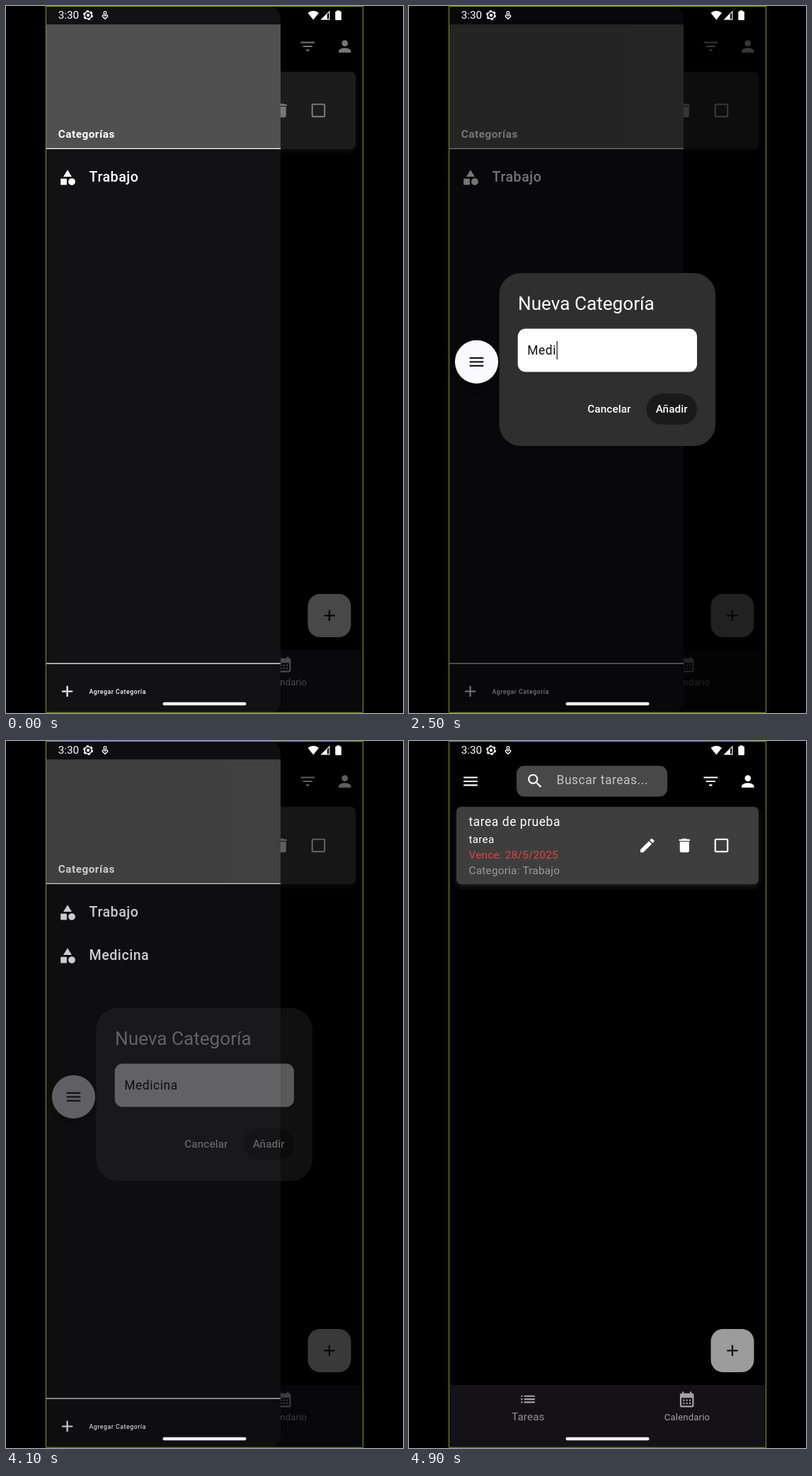
Write an HTML page that moves like this. It is 561 px wide and 998 px high and loops after 5000 ms.

```html
<!DOCTYPE html>
<html lang="es">
<head>
<meta charset="utf-8">
<title>Nueva categoría</title>
<style>
html, body { margin: 0; width: 100%; height: 100%; overflow: hidden; background: #000; }
#stage { display: block; width: 561px; height: 998px; font-family: Roboto, sans-serif; fill: #fff; }

/* type scale */
.body { font-size: 17.44px; letter-spacing: .545px; }
.small { font-size: 15.26px; letter-spacing: .27px; }
.item { font-size: 19.62px; letter-spacing: .5px; font-weight: 500; }
.label { font-size: 15.26px; letter-spacing: .11px; font-weight: 500; }
.head { font-size: 15.26px; letter-spacing: .545px; font-weight: 700; }
.tiny { font-size: 8.72px; letter-spacing: .545px; font-weight: 500; }
.title { font-size: 26.15px; }

/* one shared clock, held in 100 ms steps (2 %) */
.anim { animation: 5s step-end infinite; }
.drawer { animation-name: drawer; }
.scrim { animation-name: scrim; }
.content { animation-name: content; }
.added { animation-name: added; }
.ripple { animation-name: ripple; transform-origin: 200px 966px; }
.barrier { animation-name: barrier; }
.dialog { animation-name: dialog; }
.hint { animation-name: hint; }
.typing { animation-name: typing; }
.caret { animation-name: caret; }
.press { animation-name: press; }
.bubble { animation-name: bubble; }

/* closes like a critically damped spring */
@keyframes drawer {
  0% { transform: none; }
  88% { transform: translateX(-63px); }
  90% { transform: translateX(-269px); }
  92% { transform: translateX(-320px); }
  94% { transform: translateX(-332px); }
}
@keyframes scrim {
  0% { opacity: .54; }
  88% { opacity: .44; }
  90% { opacity: .1; }
  92% { opacity: .02; }
  94% { opacity: 0; }
}
@keyframes content {
  0% { visibility: visible; }
  76% { visibility: hidden; }
  82% { visibility: visible; }
}
@keyframes added {
  0% { opacity: 0; }
  82% { opacity: 1; }
}
@keyframes ripple {
  0% { opacity: 0; transform: scale(.2); }
  2% { opacity: .5; transform: scale(.25); }
  4% { opacity: .8; transform: scale(.45); }
  6% { opacity: 1; transform: scale(.65); }
  8% { opacity: 1; transform: scale(.85); }
  10% { opacity: 1; transform: none; }
  14% { opacity: .4; transform: none; }
  16% { opacity: 0; transform: none; }
}
@keyframes barrier {
  0% { opacity: 0; }
  10% { opacity: .36; }
  12% { opacity: .54; }
  82% { opacity: .2; }
  84% { opacity: 0; }
}
@keyframes dialog {
  0% { opacity: 0; }
  10% { opacity: .5; }
  12% { opacity: .92; }
  14% { opacity: 1; }
  82% { opacity: .35; }
  84% { opacity: 0; }
}
@keyframes hint {
  0% { visibility: visible; }
  42% { visibility: hidden; }
}
@keyframes typing {
  0% { transform: none; }
  42% { transform: translateX(15.8px); }
  44% { transform: translateX(25.6px); }
  48% { transform: translateX(36px); }
  50% { transform: translateX(41px); }
  54% { transform: translateX(50.6px); }
  56% { transform: translateX(55.5px); }
  60% { transform: translateX(75.8px); }
}
@keyframes caret {
  0% { opacity: 0; }
  32% { opacity: 1; }
  66% { opacity: 0; }
}
@keyframes press {
  0% { opacity: 0; }
  70% { opacity: .03; }
  72% { opacity: .06; }
  76% { opacity: .04; }
}
@keyframes bubble {
  0% { opacity: 0; }
  40% { opacity: .6; }
  42% { opacity: 1; }
  82% { opacity: .35; }
  84% { opacity: 0; }
}
</style>
</head>
<body>
<svg id="stage" viewBox="0 0 561 998">
  <defs>
    <!-- icons on a 24 unit grid, drawn at 26.15 px -->
    <path id="menu" transform="scale(1.09)" d="M3 18h18v-2H3zM3 13h18v-2H3zM3 6v2h18V6z"/>
    <path id="search" transform="scale(1.09)" d="M15.5 14h-.79l-.28-.27C15.41 12.59 16 11.11 16 9.5 16 5.91 13.09 3 9.5 3S3 5.91 3 9.5 5.91 16 9.5 16c1.61 0 3.09-.59 4.23-1.57l.27.28v.79l5 4.99L20.49 19zm-6 0C7.01 14 5 11.99 5 9.5S7.01 5 9.5 5 14 7.01 14 9.5 11.99 14 9.5 14z"/>
    <path id="filter" transform="scale(1.09)" d="M10 18h4v-2h-4zM3 6v2h18V6zm3 7h12v-2H6z"/>
    <path id="person" transform="scale(1.09)" d="M12 12a4 4 0 1 0 0-8 4 4 0 0 0 0 8zm0 2c-2.67 0-8 1.34-8 4v2h16v-2c0-2.66-5.33-4-8-4z"/>
    <path id="edit" transform="scale(1.09)" d="M3 17.25V21h3.75L17.81 9.94l-3.75-3.75zM20.71 7.04c.39-.39.39-1.02 0-1.41l-2.34-2.34c-.39-.39-1.02-.39-1.41 0l-1.83 1.83 3.75 3.75z"/>
    <path id="trash" transform="scale(1.09)" d="M6 19c0 1.1.9 2 2 2h8c1.1 0 2-.9 2-2V7H6zM19 4h-3.5l-1-1h-5l-1 1H5v2h14z"/>
    <path id="box" transform="scale(1.09)" d="M19 5v14H5V5h14m0-2H5c-1.1 0-2 .9-2 2v14c0 1.1.9 2 2 2h14c1.1 0 2-.9 2-2V5c0-1.1-.9-2-2-2z"/>
    <path id="add" transform="scale(1.09)" d="M19 13h-6v6h-2v-6H5v-2h6V5h2v6h6z"/>
    <path id="list" transform="scale(1.09)" d="M3 13h2v-2H3zm0 4h2v-2H3zm0-8h2V7H3zm4 4h14v-2H7zm0 4h14v-2H7zM7 7v2h14V7z"/>
    <path id="calendar" transform="scale(1.09)" d="M19 4h-1V2h-2v2H8V2H6v2H5c-1.11 0-2 .9-2 2v14c0 1.1.89 2 2 2h14c1.1 0 2-.9 2-2V6c0-1.1-.9-2-2-2zm0 16H5V10h14zM9 14H7v-2h2zm4 0h-2v-2h2zm4 0h-2v-2h2zm-8 4H7v-2h2zm4 0h-2v-2h2zm4 0h-2v-2h2z"/>
    <path id="shapes" transform="scale(1.09)" d="M12 2l-5.5 9h11zM3 13.5h8v8H3zM17.5 13a4.5 4.5 0 1 0 0 9 4.500 4.500 0 0 0 0-9z"/>
    <radialGradient id="glow">
      <stop offset=".3" stop-color="#fff" stop-opacity=".12"/>
      <stop offset="1" stop-color="#fff" stop-opacity="0"/>
    </radialGradient>
    <clipPath id="screen"><path d="M57 1H504V997H57z"/></clipPath>
    <clipPath id="tile"><path d="M57 937H388V995H57z"/></clipPath>
    <filter id="soft" x="-50%" y="-50%" width="200%" height="200%"><feGaussianBlur stdDeviation="4"/></filter>
  </defs>

  <path d="M0 0H561V998H0z" fill="#000"/>
  <g clip-path="url(#screen)">
    <!-- task page -->
    <use href="#menu" x="73.9" y="43.9"/>
    <rect x="152" y="35" width="213" height="43.5" rx="11" fill="#484848"/>
    <use href="#search" x="164.9" y="43.4"/>
    <text class="body" x="208.5" y="61" fill="#c4c4c4">Buscar tareas...</text>
    <use href="#filter" x="413.2" y="43.9"/>
    <use href="#person" x="465.7" y="43.9"/>
    <rect x="67" y="96" width="427" height="109" rx="6.5" fill="#222" filter="url(#soft)"/>
    <rect x="67" y="93" width="427" height="109" rx="6.5" fill="#3e3e3e"/>
    <text class="body" x="84.5" y="120">tarea de prueba</text>
    <text class="small" x="84.5" y="144.3">tarea</text>
    <text class="small" x="84.5" y="166" fill="#e0443c">Vence: 28/5/2025</text>
    <text class="small" x="84.5" y="188" fill="#9a9a9a">Categoria: Trabajo</text>
    <use href="#edit" x="323.7" y="134.4"/>
    <use href="#trash" x="376.2" y="134.4"/>
    <use href="#box" x="428.4" y="134.4"/>
    <rect x="426.5" y="830" width="61" height="61" rx="17.4" fill="#9c9c9c"/>
    <use href="#add" x="443.9" y="847.4" fill="#000"/>
    <path d="M57 909H504V998H57z" fill="#141217"/>
    <g fill="#a2a2a4" text-anchor="middle">
      <use href="#list" x="155" y="916"/>
      <text x="168.3" y="959" font-size="15.26" letter-spacing=".1" fill="#8f8f92">Tareas</text>
      <use href="#calendar" x="379.6" y="916.4"/>
      <text x="393" y="959" font-size="13.08" letter-spacing=".2">Calendario</text>
    </g>
    <path class="anim scrim" d="M57 0H504V998H57z" fill="#000"/>

    <!-- drawer -->
    <g class="anim drawer">
      <path d="M57 0H371a17 17 0 0 1 17 17V981a17 17 0 0 1-17 17H57z" fill="#121114"/>
      <g class="anim content">
        <path d="M57 26H388V201H57z" fill="#515051"/>
        <path d="M57 200.7H388v1.4H57zM57 927.6H388v1.1H57z"/>
        <text class="head" x="73.7" y="185.5">Categorías</text>
        <use href="#shapes" x="73.9" y="229"/>
        <text class="item" x="117.6" y="248">Trabajo</text>
        <g class="anim added">
          <use href="#shapes" x="73.9" y="290"/>
          <text class="item" x="117.6" y="309">Medicina</text>
        </g>
        <g clip-path="url(#tile)">
          <circle class="anim ripple" cx="200" cy="966" r="190" fill="url(#glow)"/>
        </g>
        <use href="#add" x="73.5" y="954.4"/>
        <text class="tiny" x="117.4" y="970.5">Agregar Categoría</text>
      </g>
    </g>
    <path class="anim barrier" d="M57 0H504V998H57z" fill="#000"/>

    <!-- dialog -->
    <g class="anim dialog">
      <rect x="127.5" y="377" width="305.5" height="244" rx="30.5" fill="#2f2f2f"/>
      <text class="title" x="154" y="429">Nueva Categoría</text>
      <rect x="153.7" y="455.5" width="253.3" height="61" rx="11" fill="#fefefe"/>
      <g class="body" fill="#0c0c0c">
        <text x="167.3" y="491.5">Medicina</text>
        <rect class="anim typing" x="167.3" y="470" width="90" height="32" fill="#fefefe"/>
        <text class="anim hint" x="167.3" y="491.5">Nombre de la categoría</text>
      </g>
      <g class="anim typing">
        <rect class="anim caret" x="167.2" y="473" width="2.2" height="26" fill="#707070"/>
      </g>
      <text class="label" x="252.3" y="574.3">Cancelar</text>
      <rect x="335.5" y="547.3" width="71.5" height="43.5" rx="21.7" fill="#1a1a1b"/>
      <rect class="anim press" x="335.5" y="547.3" width="71.5" height="43.5" rx="21.7"/>
      <text class="label" x="348.7" y="574.3">Añadir</text>
    </g>

    <!-- floating input button -->
    <g class="anim bubble">
      <circle cx="95.5" cy="507" r="31" fill="#000" opacity=".35" filter="url(#soft)"/>
      <circle cx="95.5" cy="502.3" r="30.6" fill="#faf9ff"/>
      <use href="#menu" x="82.4" y="489.3" fill="#1c1b1f"/>
    </g>
  </g>

  <!-- system bars -->
  <text x="73.7" y="18.3" font-size="15.3">3:30</text>
  <g fill="none" stroke="#fff">
    <circle cx="116" cy="13" r="5" stroke-width="1.5"/>
    <circle cx="116" cy="13" r="6.3" stroke-width="1.6" stroke-dasharray="3.3 3.3"/>
    <circle cx="140" cy="9.6" r="1.9" stroke-width="1.2"/>
    <path d="M140 18.3l-3.6-3.5q-.4-2 1.3-2.2 1.4 0 2.3 1.5 .9-1.5 2.3-1.5 1.7.2 1.3 2.2z" stroke-width="1.3"/>
  </g>
  <circle cx="116" cy="13" r="2.2"/>
  <path d="M434.3 19.5L426.5 9.7q7.8-6 15.6 0z"/>
  <path d="M444.5 19.5L457.5 6.5V19.5z"/>
  <path d="M454 11.5V18.3H456.3V9.3z" fill="#000"/>
  <path d="M467.5 7.5V6.3h4v1.2h1.4q1 0 1 1V19q0 1-1 1h-6.6q-1 0-1-1V8.5q0-1 1-1z"/>
  <rect x="221.5" y="982.8" width="118" height="4.4" rx="2.2" fill="#f0eff2"/>
  <path d="M56.5 .5H504.5V997.3H56.5z" fill="none" stroke="#7d9c10"/>
</svg>
</body>
</html>
```
